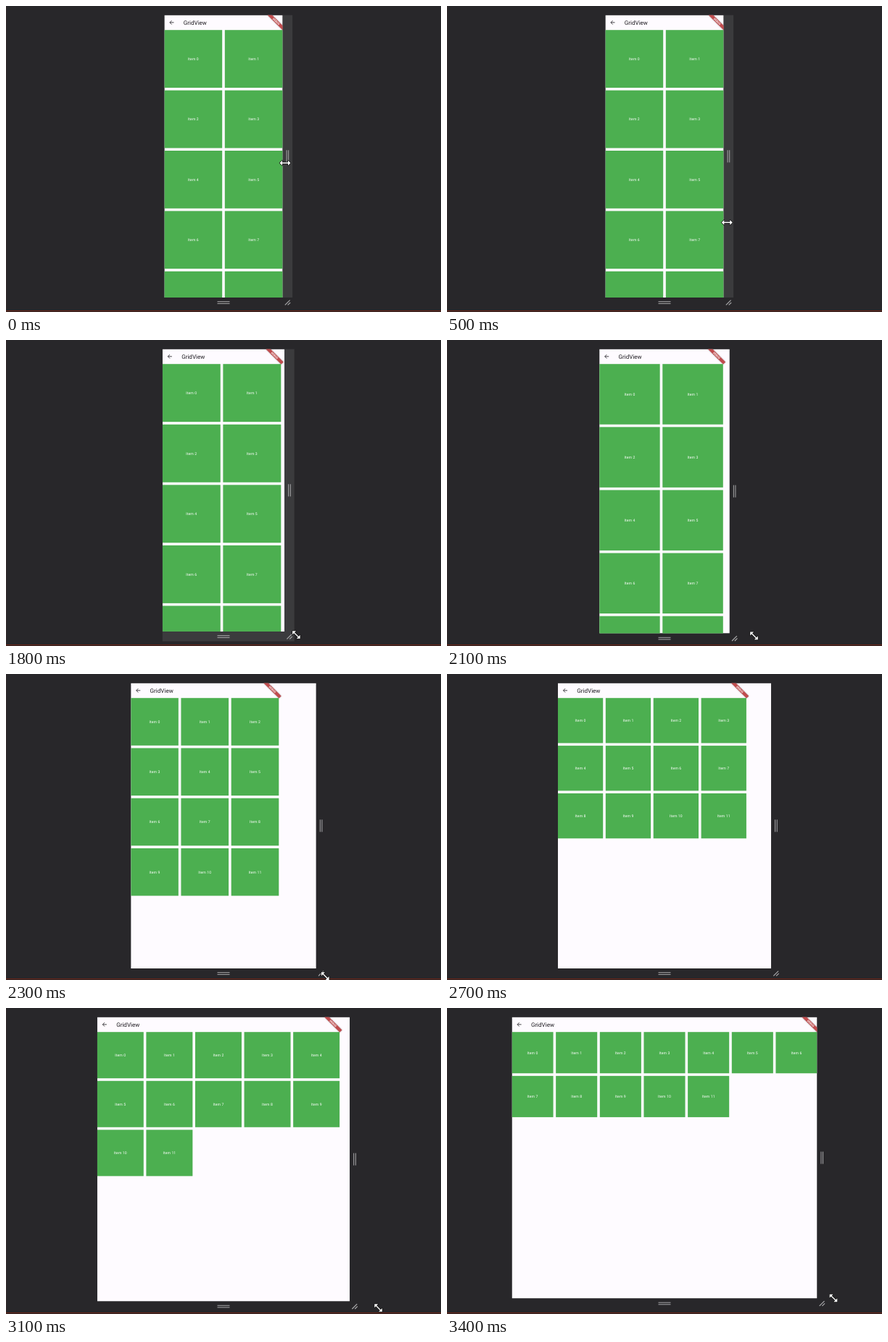
An HTML page with a canvas that plays this animation: 600 by 423 pixels, repeating every 8000 ms.

```html
<!DOCTYPE html>
<html lang="en">
<head>
<meta charset="utf-8">
<title>Responsive grid</title>
<style>
html, body { margin: 0; width: 100%; height: 100%; overflow: hidden; background: #28272a; }
canvas { display: block; width: 600px; height: 423px; }
</style>
</head>
<body>
<canvas id="stage"></canvas>
<script>
const W = 600, H = 423, LOOP = 8000, STEP = 100;
const TOP = 12.6, BAR = 20.6, GAP = 3.6, MIN_CELL = 58, ITEMS = 12;
const CENTER = W / 2, STRIP = 13.5;
const canvas = document.getElementById('stage');
const ctx = canvas.getContext('2d');
const dpr = window.devicePixelRatio || 1;
canvas.width = W * dpr;
canvas.height = H * dpr;

const HELD = [1900, 2000, 2400, 2600, 3200];

// Drag of the page edge: time, half width, ease-in power of the way there.
const DRAG = [
  [1600, 81.6, 1], [1800, 84.2, 4], [2300, 127.8, 4],
  [2600, 130, 1], [2800, 164.2, 1], [3300, 210.5, 3]
];

const ramp = (t, from, to) => Math.min(1, Math.max(0, (t - from) / (to - from)));

function smooth(t, from, to) {
  const p = ramp(t, from, to);
  return p * p * (3 - 2 * p);
}

function halfWidth(t) {
  let half = DRAG[0][1];
  for (let i = 1; i < DRAG.length; i++) {
    const [t1, h1, power] = DRAG[i], [t0, h0] = DRAG[i - 1];
    half += (h1 - h0) * ramp(t, t0, t1) ** power;
  }
  return half;
}

const pageBottom = t => 403 + 4 * smooth(t, 1800, 2300) - 5.5 * smooth(t, 3000, 3300);

// Down to the corner, then out with it, dipping below the stage on the way.
function pointerAt(t) {
  return {
    x: 385 + 3 * smooth(t, 0, 1100) + 145 * ramp(t, 1600, 3300) ** 1.15,
    y: 217 + 190.5 * smooth(t, 0, 1100) + 32 * smooth(t, 2000, 2800) - 38.5 * smooth(t, 2800, 3300)
  };
}

function rect(x, y, w, h, color) {
  ctx.fillStyle = color;
  ctx.fillRect(x, y, w, h);
}

function line(color, width, ...p) {
  ctx.strokeStyle = color;
  ctx.lineWidth = width;
  ctx.beginPath();
  for (let i = 0; i < p.length; i += 2) ctx.lineTo(p[i], p[i + 1]);
  ctx.stroke();
}

function text(str, x, y, size, color, align = 'center', weight = 400, spacing = 0) {
  ctx.font = `${weight} ${size}px Roboto, sans-serif`;
  ctx.textRendering = 'geometricPrecision';
  ctx.letterSpacing = spacing + 'px';
  ctx.textAlign = align;
  ctx.fillStyle = color;
  ctx.fillText(str, x, y);
}

function drawHover(t, left, right, bottom) {
  const color = '#3b3b3d';
  if (t >= 2100) return;
  rect(right, TOP, STRIP, bottom - TOP, color);
  if (t >= 1200) rect(left, bottom, right + STRIP - left, STRIP, color);
}

function drawHandles(right, bottom) {
  const color = '#a9a9ab', x = right + 6.8, y = bottom + 7, mid = (TOP + bottom) / 2;
  for (const d of [-1.3, 1.3]) {
    line(color, 1, x + d, mid - 8.5, x + d, mid + 8.5);
    line(color, 1, CENTER - 8.5, y + d, CENTER + 8.5, y + d);
  }
  line(color, 1.2, x - 3.6, y + 3.4, x + 3.2, y - 3.4);
  line(color, 1.2, x + 0.2, y + 3.4, x + 3.8, y - 0.2);
}

function drawBanner(right) {
  ctx.save();
  ctx.translate(right, TOP);
  ctx.rotate(Math.PI / 4);
  ctx.shadowColor = 'rgba(0,0,0,.4)';
  ctx.shadowBlur = 2 * dpr;
  rect(-15, 10.2, 30, 4.5, '#c04c4e');
  ctx.shadowBlur = 0;
  text('DEBUG', 0, 13.8, 3.8, '#fff', 'center', 700);
  ctx.restore();
}

function drawGrid(left, width) {
  const cols = Math.floor(width / MIN_CELL);
  const cell = (width - GAP * (cols - 1)) / cols, pitch = cell + GAP;
  for (let i = 0; i < ITEMS; i++) {
    const x = left + (i % cols) * pitch;
    const y = TOP + BAR + Math.floor(i / cols) * pitch;
    rect(x, y, cell, cell, '#4caf50');
    text('Item ' + i, x + cell / 2, y + cell / 2 + 1.9, 5.12, '#fff', 'center', 400, 0.09);
  }
}

function drawPage(left, right, bottom, width) {
  ctx.save();
  ctx.beginPath();
  ctx.rect(left, TOP, right - left, bottom - TOP);
  ctx.clip();
  rect(left, TOP, right - left, bottom - TOP, '#fefbff');
  const x = left + 10.2, y = TOP + 10.2, ink = '#1d1b20';
  line(ink, 0.8, x + 2.9, y, x - 2.6, y);
  line(ink, 0.8, x, y - 2.7, x - 2.7, y, x, y + 2.7);
  text('GridView', left + 26.4, TOP + 13, 8.05, ink, 'left');
  drawGrid(left, width);
  drawBanner(left + width);
  ctx.restore();
}

function drawPointer({ x, y }, angle) {
  ctx.save();
  ctx.translate(x, y);
  ctx.rotate(angle);
  ctx.beginPath();
  for (const side of [1, -1]) {
    ctx.lineTo(-7.5 * side, 0);
    ctx.lineTo(-4 * side, -3.5 * side);
    ctx.lineTo(-4 * side, -0.7 * side);
    ctx.lineTo(4 * side, -0.7 * side);
    ctx.lineTo(4 * side, -3.5 * side);
  }
  ctx.closePath();
  ctx.strokeStyle = '#111';
  ctx.lineWidth = 1.4;
  ctx.lineJoin = 'round';
  ctx.stroke();
  ctx.fillStyle = '#fff';
  ctx.fill();
  ctx.restore();
}

function draw(t) {
  const half = halfWidth(t), left = CENTER - half, right = CENTER + half;
  const bottom = pageBottom(t);
  const width = 2 * halfWidth(t - STEP); // layout lags one step behind the edge
  const pointer = pointerAt(t);

  ctx.setTransform(dpr, 0, 0, dpr, 0, 0);
  rect(0, 0, W, H, '#28272a');
  rect(0, 0, 0.6, H, '#36282a');
  rect(0, 421, W, 1, '#702414');
  drawHover(t, left, right, bottom);
  drawHandles(right, bottom);
  drawPage(left, right, bottom, width);
  drawPointer(pointer, pointer.y < 400 ? 0 : Math.PI / 4);
}

function tick(now) {
  let t = Math.floor((now % LOOP) / STEP) * STEP;
  while (HELD.includes(t)) t -= STEP;
  draw(t);
  requestAnimationFrame(tick);
}
requestAnimationFrame(tick);
</script>
</body>
</html>
```
